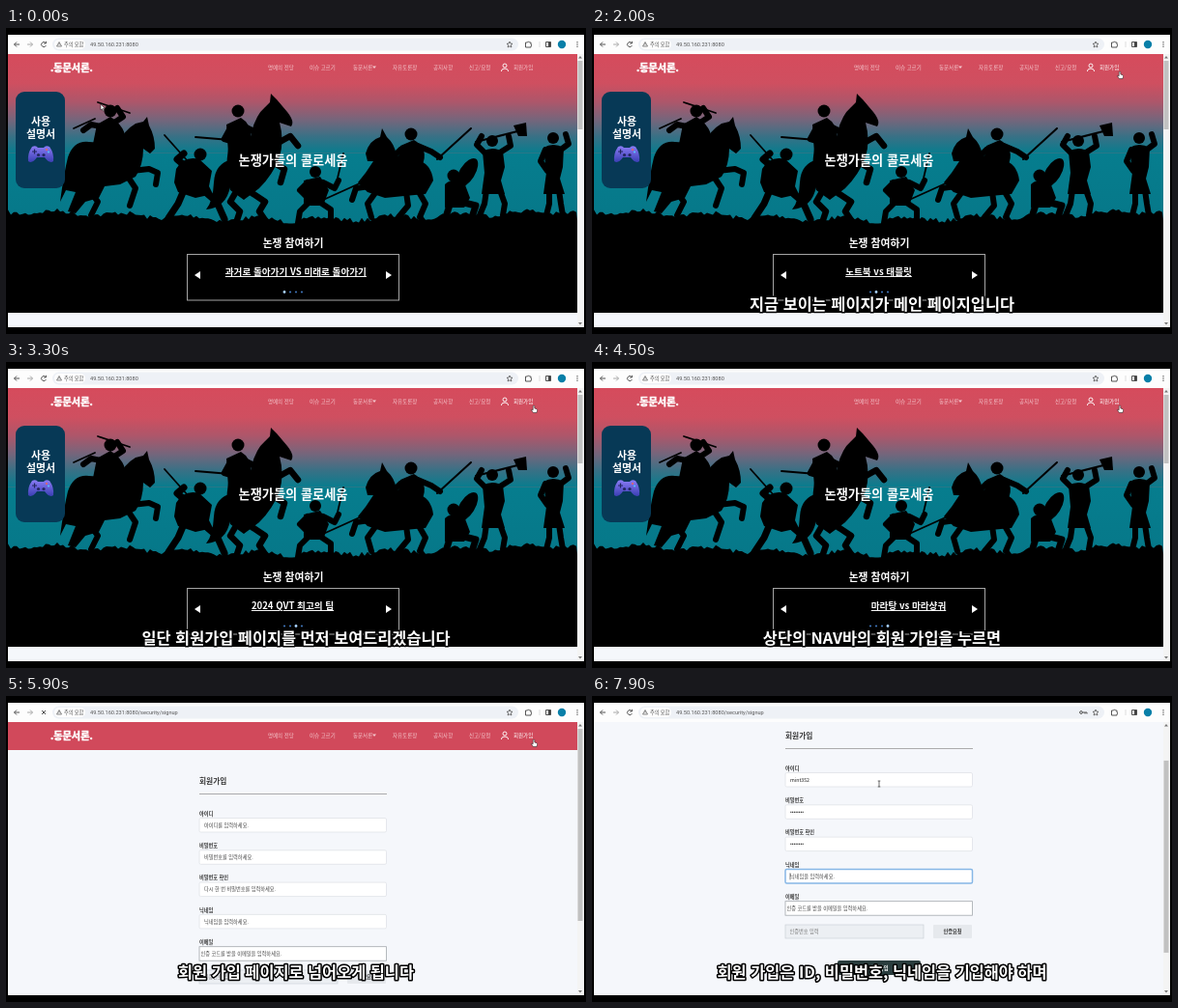
Recreate the animation shown at these times as an HTML page. Size 600 by 317 pixels, loop 8 s.

```html
<!DOCTYPE html>
<html lang="ko">
<head>
<meta charset="utf-8">
<title>토론 사이트 소개</title>
<style>
html, body { margin: 0; height: 100%; overflow: hidden; background: #000; }
svg { display: block; width: 100vw; height: 100vh; }
text { font-family: 'Noto Sans CJK KR', 'Noto Sans CJK JP', 'Noto Sans CJK', sans-serif; white-space: pre; }
.mid { text-anchor: middle; }
.url text { font-family: Roboto, 'Noto Sans CJK KR', sans-serif; font-size: 5.6px; fill: #555; }
.icon { fill: none; stroke: #555; stroke-width: 1; }
.nav { font-size: 5.5px; fill: #f4c6cc; }
.slide { font-size: 9.6px; font-weight: 700; fill: #fff; text-decoration: underline; }
.label { font-size: 5.2px; font-weight: 700; fill: #333; }
.value { font-size: 5.2px; fill: #444; }
#caption { font-size: 16.35px; font-weight: 700; fill: #fff; stroke: #000; stroke-width: 3; stroke-linejoin: round; paint-order: stroke; }
.limb { fill: none; stroke: #000; stroke-linecap: round; stroke-linejoin: round; }
</style>
</head>
<body>
<svg viewBox="0 0 600 317" preserveAspectRatio="none">
<defs>
  <linearGradient id="sky" gradientUnits="userSpaceOnUse" x1="0" y1="26" x2="0" y2="200">
    <stop offset="0" stop-color="#d64b5c"/><stop offset=".18" stop-color="#cf4f60"/>
    <stop offset=".29" stop-color="#ad566a"/><stop offset=".4" stop-color="#74667c"/>
    <stop offset=".5" stop-color="#377186"/><stop offset=".6" stop-color="#067d8e"/>
    <stop offset="1" stop-color="#067889"/>
  </linearGradient>
  <linearGradient id="pad" x2="0" y2="1"><stop stop-color="#8b7cf5"/><stop offset="1" stop-color="#3b3fb4"/></linearGradient>
  <clipPath id="view"><rect x="2" y="27" width="596" height="283"/></clipPath>
  <clipPath id="box"><rect x="188" y="235" width="218" height="47"/></clipPath>
</defs>

<g clip-path="url(#view)">
  <rect x="2" y="27" width="596" height="283" fill="#f5f7fb"/>

  <g id="home">
    <rect x="2" y="27" width="589" height="268" fill="url(#sky)"/>
    <path d="M2 129.5H591" stroke="#8a6a78" stroke-width=".5" opacity=".5"/>
    <path id="ground"/>
    <!-- rider on the left -->
    <path d="M64 134Q70 116 86 118L116 120Q122 106 134 99L142 97 146 92 148 101Q154 112 154 125L149 130 142 125Q142 142 134 154L118 162 102 164 96 176 82 180 72 192 64 190 72 170 62 168 56 180Q60 150 64 134Z"/>
    <path d="M94 100L108 92Q124 102 124 118L122 146 113 152 103 134 88 130Z"/>
    <circle cx="108" cy="86" r="6.5"/>
    <path class="limb" stroke-width="6" d="M98 102L88 100 80 106M112 98L121 92 115 83M130 148L148 146 157 150 155 162M126 154L134 166 128 184M86 168L95 180 88 194"/>
    <path class="limb" stroke-width="1.8" d="M95 77L128 88M70 104L92 94"/>
    <!-- swordsman on foot -->
    <path d="M176 146Q184 132 200 136L213 148 210 164 214 172 196 176 178 170 174 160Z"/>
    <circle cx="201" cy="131" r="6.5"/>
    <path class="limb" stroke-width="7" d="M184 142L177 136 184 130M184 168L178 182 168 197M204 168L218 180 226 198"/>
    <path class="limb" stroke-width="1.8" d="M164 111L188 138"/>
    <!-- rearing horse -->
    <path d="M230 125Q242 112 252 118 256 92 268 82L273 77 274 68 280 74 291 87Q299 97 295 102L283 98Q288 116 283 134 276 152 262 166L246 178 232 168Q226 150 230 125Z"/>
    <path d="M234 136Q216 140 215 160T207 188Q228 186 232 164Z"/>
    <path d="M228 100L243 93Q255 100 253 118L262 134 258 152 250 150 246 136 230 130Z"/>
    <circle cx="240" cy="86" r="6.5"/>
    <path class="limb" stroke-width="6.5" d="M232 104L226 115 236 118M246 102L258 108 264 102M276 122L294 112 302 122M274 138L288 146 284 160M250 168L268 180 262 190 270 202M240 166L232 180 242 190 238 202"/>
    <path class="limb" stroke-width="1.8" d="M196 113L244 117"/>
    <!-- lunging fighter -->
    <path d="M308 158L325 154 334 168 328 184 308 184Z"/><circle cx="320" cy="149" r="6"/>
    <path class="limb" stroke-width="6" d="M314 180L304 190 302 202M324 180L336 188 336 202M328 160L340 166 344 158M312 160L304 168 312 176"/>
    <path class="limb" stroke-width="1.8" d="M326 179L368 160M341 164L349 130"/>
    <!-- rider on the right -->
    <path d="M372 130Q376 116 387 113L389 104 394 113Q402 120 404 132L424 136Q440 140 442 158L434 172 412 174 392 176 374 170 364 160 372 150 380 138 374 138Z"/>
    <path d="M408 122L422 116Q436 124 432 138L428 150 434 164 426 168 416 152 404 144Z"/>
    <circle cx="419" cy="110" r="6.5"/>
    <path class="limb" stroke-width="6" d="M426 122L440 128 449 134M408 126L400 134 408 140M376 164L362 166 358 178M384 168L374 182 378 196M426 168L434 182 428 196M414 170L416 184 406 196"/>
    <path class="limb" stroke-width="2" d="M446 136L481 104"/>
    <!-- crouching shield bearer -->
    <path d="M454 162Q462 154 474 160L480 176 474 186 454 186Z"/><circle cx="463" cy="153" r="6.5"/>
    <ellipse cx="477" cy="150" rx="8" ry="17" transform="rotate(32 477 150)"/>
    <path class="limb" stroke-width="7" d="M460 180L455 196M470 180L486 184 482 196"/>
    <!-- axe fighter -->
    <path d="M493 128Q503 122 514 128L516 144 512 158 516 172 492 172 495 150Z"/><circle cx="503" cy="117" r="6"/>
    <path class="limb" stroke-width="6" d="M496 130L487 121 492 112M511 129L522 122 520 112M497 168L495 182 490 194M511 168L516 182 514 194"/>
    <path class="limb" stroke-width="2" d="M486 118L537 105"/><path d="M525 101L538 98 539 112 530 112Z"/>
    <!-- fighter at the edge -->
    <path d="M556 124Q566 118 577 124L576 144 573 156 578 172 556 172 559 150Z"/><circle cx="566" cy="114" r="6"/>
    <path class="limb" stroke-width="6" d="M574 126L582 120 579 110M558 126L553 138 560 148M562 168L562 182 559 194M572 168L574 182 576 194"/>

    <g class="mid" font-weight="700" fill="#fff">
      <text x="297" y="142" font-size="13.2">논쟁가들의 콜로세움</text>
      <text x="297" y="227" font-size="10.8">논쟁 참여하기</text>
    </g>
    <rect x="187.5" y="234.5" width="219" height="47.5" fill="none" stroke="#a5a5a5"/>
    <g clip-path="url(#box)">
      <text class="slide mid" id="gone" y="256"/>
      <text class="slide mid" id="shown" y="256"/>
    </g>
    <path d="M201 252V260L195 256ZM393 252V260L399 256Z" fill="#fff"/>
    <g id="dots"/>
    <rect x="10" y="66" width="51" height="100" rx="9" fill="#073956"/>
    <g class="mid" font-size="10.9" font-weight="700" fill="#fff">
      <text x="36" y="101">사용</text><text x="36" y="114">설명서</text>
    </g>
    <path d="M27 123Q31 121 33 124H39Q41 121 45 123 50 130 49 138 45 141 40 134H32Q27 141 23 138 22 130 27 123Z" fill="url(#pad)"/>
    <path d="M27 128H32M29.5 125.5V130.5" stroke="#232660" stroke-width="1.2"/>
    <circle cx="42" cy="126" r="1" fill="#e65"/><circle cx="44" cy="128.5" r="1" fill="#5cf"/>
    <circle cx="33.5" cy="131.5" r="1.6" fill="#232660"/><circle cx="39" cy="131.5" r="1.6" fill="#232660"/>
  </g>

  <g id="page">
    <rect id="bar" x="2" y="27" width="589" height="29" fill="#d1495b"/>
    <text x="46" y="45" font-size="10.1" font-weight="700" fill="#fff" stroke="#fff" stroke-width=".5">.동문서론.</text>
    <g class="nav" id="nav">
      <path d="M379 39.5H383L381 42Z"/>
      <g fill="none" stroke="#fff" stroke-width=".9"><circle cx="516" cy="39" r="2"/><path d="M512.3 45Q512.5 42 516 42T519.7 45"/></g>
      <text id="join" x="525" y="43">회원가입</text>
    </g>
    <g id="form">
      <text x="200" y="91" font-size="7.7" font-weight="700" fill="#333">회원가입</text>
      <path d="M200 101.5H394" stroke="#999" stroke-width=".8"/>
      <g id="fields"/>
      <rect x="200" y="284" width="143" height="14" fill="#eceff3" stroke="#ccd1d7" stroke-width=".7"/>
      <text class="value" x="204.5" y="293" style="fill:#777">인증번호 입력</text>
      <rect x="353" y="284" width="40" height="14" rx="1" fill="#e6e9ed"/>
      <text class="label mid" x="373" y="293">인증요청</text>
      <rect x="254" y="321" width="86" height="15" rx="2" fill="#2a3d3e"/>
      <text class="label mid" x="297" y="331" style="fill:#fff">회원가입</text>
    </g>
  </g>

  <rect x="591" y="27" width="7" height="283" fill="#f4f4f4"/>
  <path d="M592 31.5H596L594 29ZM592 305H596L594 307.5Z" fill="#777"/>
  <rect id="thumb" x="591.5" width="5" fill="#c1c1c1"/>
</g>

<g class="url">
  <rect x="2" y="7" width="596" height="20" fill="#fdfdfd"/>
  <rect x="48" y="10.5" width="482" height="13" rx="6.5" fill="#eef1f6"/>
  <rect x="50" y="12" width="32" height="10" rx="5" fill="#fdfdfd"/>
  <path class="icon" d="M14 17H8.5M11 14.5L8.5 17 11 19.5"/>
  <path class="icon" style="stroke:#aaa" d="M22 17H27.5M25 14.5L27.5 17 25 19.5"/>
  <path class="icon" id="reload" d="M41 15.5A2.5 2.5 0 1 0 41.4 18M41.4 13.8V16H39.2"/>
  <path class="icon" id="stop" d="M37 15L41 19M41 15L37 19"/>
  <path class="icon" style="stroke-width:.7" d="M55 14.5L57.5 19H52.5ZM55 16.2V17.6"/>
  <text x="60" y="19" style="font-size:5.2px">주의 요함</text>
  <text id="address" x="87" y="19"/>
  <g id="key" class="icon"><circle cx="506" cy="17" r="1.4"/><path d="M507.5 17H512V18.5M510 17V18.5"/></g>
  <path class="icon" style="stroke-width:.8" d="M521 14L521.9 16.1 524 16.3 522.4 17.8 522.9 20 521 18.8 519.1 20 519.6 17.8 518 16.3 520.1 16.1Z"/>
  <path class="icon" d="M537.5 15H539.5Q540.5 12.7 541.5 15H543V17Q545 17.7 543 18.6V20H537.5Z"/>
  <path d="M552 14V20" stroke="#ccc" stroke-width=".6"/>
  <path class="icon" d="M558.5 14.5H563.5V19.5H558.5Z"/><path d="M561 14.5H563.5V19.5H561Z" fill="#444"/>
  <circle cx="575" cy="17" r="4.2" fill="#087fa8"/>
  <g fill="#555"><circle cx="591" cy="14.8" r=".7"/><circle cx="591" cy="17" r=".7"/><circle cx="591" cy="19.2" r=".7"/></g>
</g>

<g id="pointer">
  <path id="arrow" d="M0 0V6L1.4 4.8 2.4 7 3.4 6.5 2.4 4.4H4.3Z" fill="#fff" stroke="#111" stroke-width=".5"/>
  <path id="hand" d="M-.8-2.5Q0-3.5.8-2.5V0L3 .7Q3.8 1 3.5 2.5L3 4.5H-.6L-2.6 1.6Q-2.3.7-.8 1.7Z" fill="#fff" stroke="#111" stroke-width=".5"/>
  <path id="beam" d="M-1.3-3H1.3M0-3V3M-1.3 3H1.3" fill="none" stroke="#333" stroke-width=".7"/>
</g>
<text id="caption" class="mid" x="300" y="292"/>
</svg>

<script>
const LOOP = 8000, OPEN = 5600;
const $ = id => document.getElementById(id);
const show = (id, on) => $(id).style.display = on ? '' : 'none';
const clamp = v => Math.min(1, Math.max(0, v));
const ease = u => (u = clamp(u), u < .5 ? 4 * u ** 3 : 1 - 4 * (1 - u) ** 3);

const slides = ['과거로 돌아가기 VS 미래로 돌아가기', '노트북 vs 태블릿', '2024 QVT 최고의 팀', '마라탕 vs 마라샹궈'];
const slideStarts = [-505, 1230, 2650, 4098];
const captions = [
  [600, '지금 보이는 페이지가 메인 페이지입니다'],
  [2500, '일단 회원가입 페이지를 먼저 보여드리겠습니다'],
  [3900, '상단의 NAV바의 회원 가입을 누르면'],
  [5450, '회원 가입 페이지로 넘어오게 됩니다'],
  [6950, '회원 가입은 ID, 비밀번호, 닉네임을 기입해야 하며']
];
const menu = [[271, '명예의 전당'], [314, '이슈 고르기'], [359, '동문서론'], [400, '자유토론장'], [442, '공지사항'], [479, '신고/요청']];
// label, hint, typed value, time of focus
const fields = [
  ['아이디', '아이디를 입력하세요.', 'mint352', 6800],
  ['비밀번호', '비밀번호를 입력하세요.', '••••••••', 7200],
  ['비밀번호 확인', '다시 한 번 비밀번호를 입력하세요.', '••••••••', 7450],
  ['닉네임', '닉네임을 입력하세요.', '', 7720],
  ['이메일', '인증 코드를 받을 이메일을 입력하세요.', '', LOOP]
];
const route = [[0, 98, 79], [250, 98, 79], [1000, 544, 41], [1220, 544, 41], [1350, 546, 48], [6300, 546, 48], [6700, 297, 91]];

$('nav').insertAdjacentHTML('beforeend', menu.map(([x, s]) => `<text x="${x}" y="43">${s}</text>`).join(''));
$('dots').innerHTML = slides.map((_, i) => `<circle cx="${288 + 6 * i}" cy="273.5"/>`).join('');
$('fields').innerHTML = fields.map(([label], i) => {
  const y = 126.5 + 33.3 * i, email = i === 4;
  return `<text class="label" x="200" y="${y - 2.7}">${label}</text>
    <rect class="input" x="200" y="${y}" width="193.5" height="14.5" rx="${email ? 0 : 1.5}" fill="#fff"/>
    <text class="value" x="${email ? 201.5 : 205}" y="${y + 9.2}"></text>
    <path class="caret" d="M205 ${y + 4}v7" stroke="#222" stroke-width=".6"/>`;
}).join('');

// rough ground, higher at both sides
let seed = 7;
const random = () => (seed = seed * 16807 % 2147483647) / 2147483647;
let rim = 'M2 295';
for (let x = 2; x <= 591; x += 3) rim += `L${x} ${192 - 4 * Math.cos(x / 94) + 2 * Math.sin(x / 11) + 5 * random()}`;
$('ground').setAttribute('d', rim + 'L591 200V295Z');

const inputs = document.querySelectorAll('.input'), values = document.querySelectorAll('.value'),
  carets = document.querySelectorAll('.caret'), dots = $('dots').children;

function drawCarousel(t) {
  const n = slideStarts.findLastIndex(s => t >= s);
  const p = ease((t - slideStarts[n]) / 600);
  $('shown').textContent = slides[n];
  $('shown').setAttribute('x', 296.5 + 219 * (1 - p));
  $('gone').textContent = p < 1 ? slides[(n + 3) % 4] : '';
  $('gone').setAttribute('x', 296.5 - 219 * p);
  [...dots].forEach((dot, i) => {
    dot.setAttribute('r', i === n ? 1.4 : 1.1);
    dot.setAttribute('fill', i === n ? '#a9d2ff' : '#3f74b8');
  });
}

function drawForm(t) {
  fields.forEach(([, hint, typed, start], i) => {
    const focused = t >= start && t < (fields[i + 1]?.[3] ?? LOOP);
    const text = typed.slice(0, Math.max(0, Math.floor((t - start) / 30)));
    values[i].textContent = text || hint;
    values[i].style.fill = text ? '#222' : '#444';
    inputs[i].setAttribute('stroke', focused ? '#86b7e6' : i === 4 ? '#a4a8ad' : '#e0e3e8');
    inputs[i].setAttribute('stroke-width', focused ? 1.5 : .8);
    carets[i].style.display = focused && !text ? '' : 'none';
  });
}

function drawPointer(t) {
  const n = route.findLastIndex(r => t >= r[0]);
  const a = route[n], b = route[n + 1] || a;
  const p = ease((t - a[0]) / (b[0] - a[0] || 1));
  $('pointer').setAttribute('transform', `translate(${a[1] + (b[1] - a[1]) * p} ${a[2] + (b[2] - a[2]) * p})`);
  const hover = t >= 1300 && t < 6350;
  show('hand', hover);
  show('beam', t >= 6650);
  show('arrow', !hover && t < 6650);
  $('join').style.fill = hover ? '#fff' : '';
}

function draw() {
  const t = performance.now() % LOOP, signup = t >= OPEN;
  const scroll = signup ? 47 * ease((t - 6450) / 250) : 0;
  show('home', !signup);
  show('bar', signup);
  show('form', signup);
  $('page').setAttribute('transform', `translate(0 ${-scroll})`);
  $('thumb').setAttribute('y', 34 + scroll * .7);
  $('thumb').setAttribute('height', signup ? 199 : 71);

  const loading = t >= 5500 && t < 6400;
  show('stop', loading);
  show('reload', !loading);
  show('key', t >= 7300);
  $('address').textContent = '49.50.160.231:8080' + (signup ? '/security/signup' : '');

  if (signup) drawForm(t); else drawCarousel(t);
  drawPointer(t);
  $('caption').textContent = captions.findLast(c => t >= c[0])?.[1] ?? '';
  requestAnimationFrame(draw);
}
draw();
</script>
</body>
</html>
```
